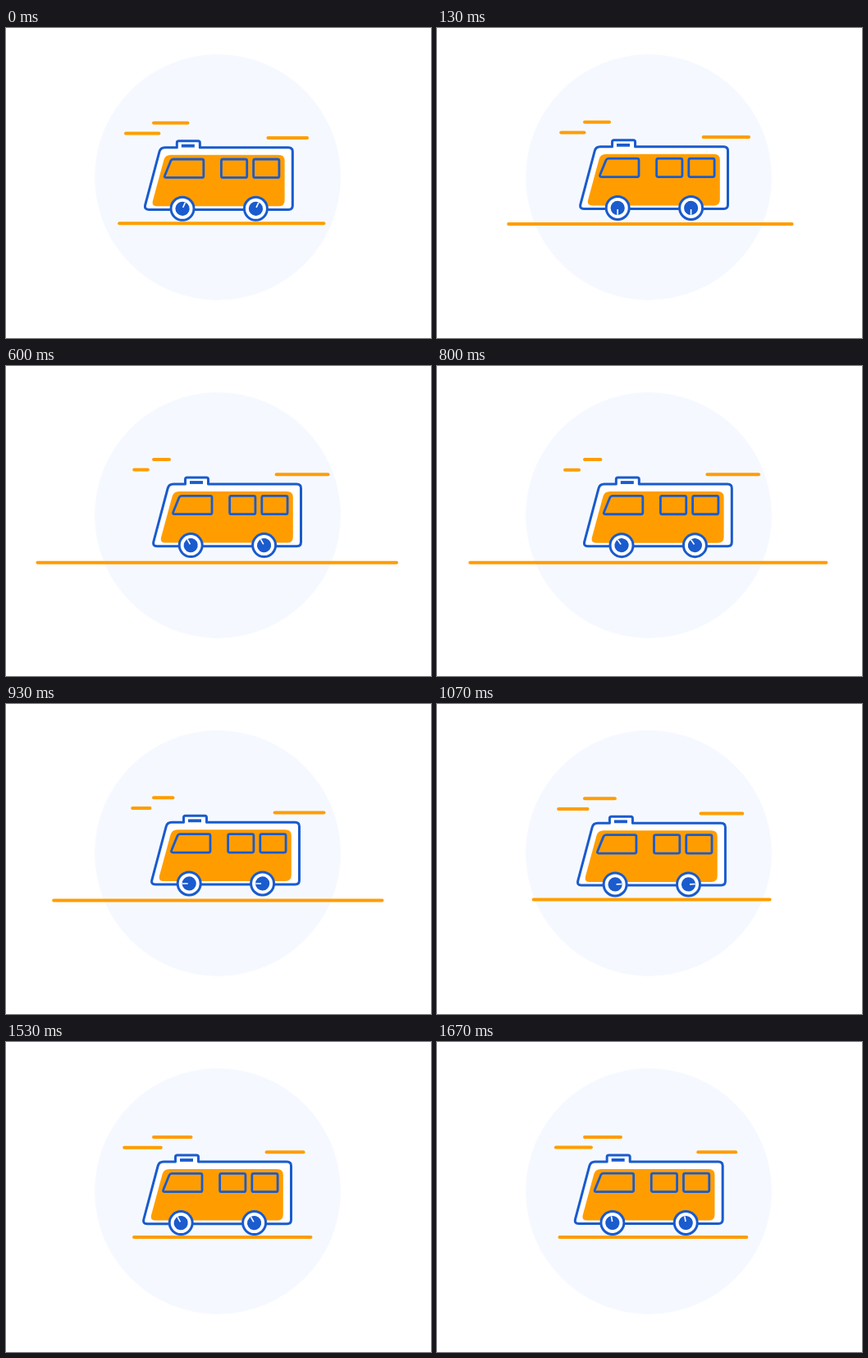
An HTML page that plays this animation: 518x378 px, repeating every 1740 ms.

```html
<!DOCTYPE html>
<html lang="en">
<head>
<meta charset="utf-8">
<title>Travelling bus</title>
<style>
html, body { margin: 0; width: 100%; height: 100%; overflow: hidden; background: #fff; }
svg { display: block; width: 518px; height: 378px; }
.line { stroke: #ff9d00; stroke-width: 4; stroke-linecap: round; }
.ink { fill: none; stroke: #1a5bce; stroke-width: 3; stroke-linejoin: round; }
</style>
</head>
<body>
<svg viewBox="0 0 518 378">
  <defs>
    <g id="wheel">
      <circle r="8.6" fill="#1a5bce"/>
      <path d="M0 -1.5V-8.3" stroke="#fff" stroke-width="1.6"/>
    </g>
  </defs>
  <circle cx="258" cy="182" r="150" fill="#f5f9ff"/>
  <g id="lines"></g>
  <g id="bus">
    <path class="ink" style="fill:#fff" d="M204 144H218.5V138.2Q218.5 136 220.7 136H244.3Q246.5 136 246.5 138.2V144H354.5Q359.5 144 359.5 149V214.7Q359.5 219.7 354.5 219.7H184Q178.5 219.7 179.9 214L197.2 149Q198.5 144 204 144Z"/>
    <path d="M224 142H240" stroke="#1a5bce" stroke-width="3.8"/>
    <path fill="#ff9d00" d="M211 153H342.5Q349.8 153 349.8 160V208.5Q349.8 215.6 342.5 215.6H194Q187.3 215.6 189.2 208.5L202.6 159Q204.2 153 211 153Z"/>
    <g class="ink" style="stroke-width:2.8">
      <path d="M214 158.3H249Q251 158.3 251 160.3V178.7Q251 180.7 249 180.7H205.5Q202.6 180.7 203.8 178L211 160.3Q212 158.3 214 158.3Z"/>
      <rect x="272.6" y="158.3" width="31.3" height="22.4" rx="2"/>
      <rect x="311.8" y="158.3" width="31.3" height="22.4" rx="2"/>
    </g>
    <g id="wheels">
      <g transform="translate(225.2 218.6)"><circle class="ink" style="fill:#fff" r="14"/><use href="#wheel"/></g>
      <g transform="translate(314.6 218.6)"><circle class="ink" style="fill:#fff" r="14"/><use href="#wheel"/></g>
    </g>
  </g>
</svg>
<script>
const FRAMES = 26, LOOP = 1740, STEP = 1000 / 15;
const $ = id => document.getElementById(id);

// Each line: left, right and y at rest, then how far each travels.
const specs = [
  [180, 225.5, 116, 0, -26.5, -2],
  [144.2, 188.8, 128.7, 12, -16, -2.1],
  [317.6, 362.5, 134.3, 12, 30, -2.1],
  [156, 371.5, 238, -117.5, 104.5, 1.8]
];
const lines = specs.map(() => {
  const el = document.createElementNS("http://www.w3.org/2000/svg", "line");
  el.setAttribute("class", "line");
  return $("lines").appendChild(el);
});
const hubs = document.querySelectorAll("#wheels use");

// Cubic easing with flat ends and handle positions a and b.
function ease(x, a, b) {
  if (x <= 0) return 0;
  if (x >= 1) return 1;
  let lo = 0, hi = 1;
  for (let i = 0; i < 24; i++) {
    const u = (lo + hi) / 2, v = 1 - u;
    if (3 * a * u * v * v + 3 * b * u * u * v + u ** 3 < x) lo = u; else hi = u;
  }
  return lo * lo * (3 - 2 * lo);
}

function progress(n) {
  if (n >= 10 && n < 22) return 1 - ease((n - 10.8) / 9.2, .65, .35);
  const since = (n - 22.9 + FRAMES) % FRAMES;
  return n === 22 ? 0 : ease(since / 11.5, .53, .235);
}

function draw(p) {
  specs.forEach(([l, r, y, dl, dr, dy], i) => {
    const yy = y + dy * p;
    const at = { x1: l + dl * p, x2: r + dr * p, y1: yy, y2: yy };
    for (const k in at) lines[i].setAttribute(k, at[k]);
  });
  $("bus").setAttribute("transform", `translate(${-12 * (1 - p)} ${2 * (1 - p)})`);
  hubs.forEach(h => h.setAttribute("transform", `rotate(${360 * p - 30})`));
}

function tick() {
  const t = performance.now() % LOOP;
  draw(progress(Math.min(FRAMES - 1, Math.floor((t + 5) / STEP))));
  requestAnimationFrame(tick);
}
tick();
</script>
</body>
</html>
```
